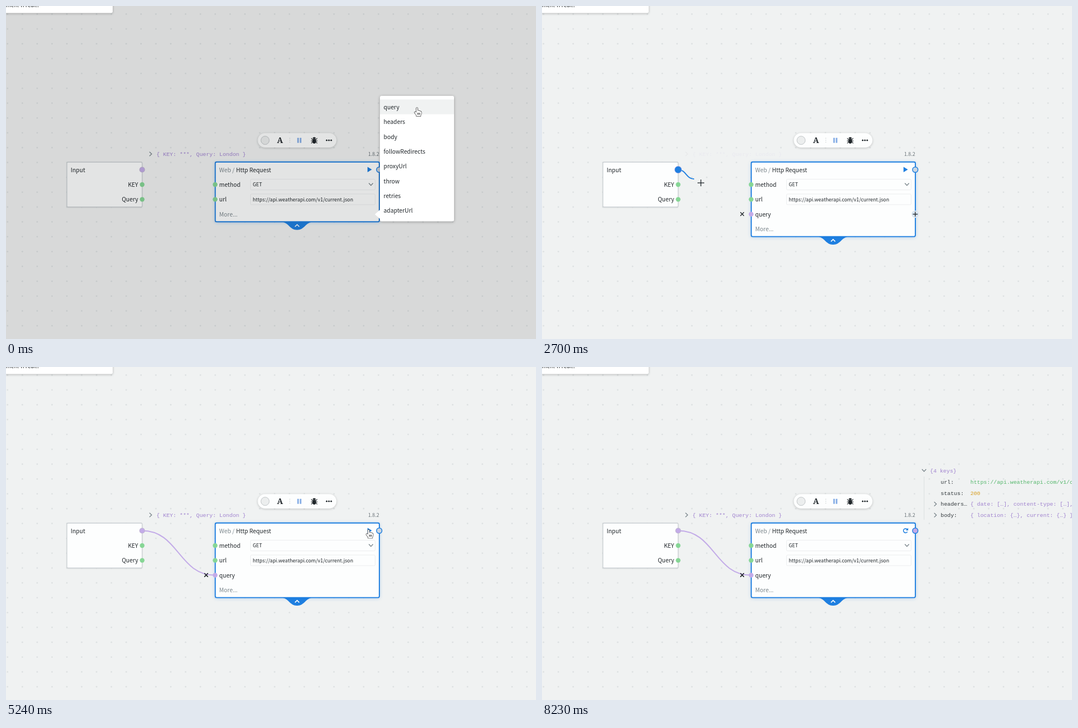
Animation of 944 by 593 pixels, one loop 8.38 s. Source, as an HTML page with a canvas:

```html
<!DOCTYPE html>
<html lang="en">
<head>
<meta charset="utf-8">
<title>Node editor</title>
<style>
html, body { margin: 0; width: 100%; height: 100%; overflow: hidden; background: #f0f2f2; }
canvas { display: block; width: 944px; height: 593px; }
</style>
</head>
<body>
<canvas id="stage"></canvas>
<script>
const W = 944, H = 593, LOOP = 8380, ROW = 26.43;
const canvas = document.getElementById('stage');
const ctx = canvas.getContext('2d');
const dpr = window.devicePixelRatio || 1;
canvas.width = W * dpr;
canvas.height = H * dpr;

const SANS = '"Noto Sans CJK JP", "Noto Sans CJK SC", "Noto Sans", sans-serif';
const MONO = '"Liberation Mono", "Courier New", monospace';
const BLUE = '#1f7fe0', PURPLE = '#c3abe8', GREEN = '#86d695', INK = '#20262a';
const GREY = '#7b868c', VIOLET = '#a083cf';
const rowY = i => 291.5 + i * ROW;

// Pointer waypoints: time, x, y
const PATH = [
  [0, 732, 181], [450, 731, 181], [900, 731, 181], [1050, 700, 196], [1200, 500, 296],
  [1350, 343, 353], [1500, 290, 366], [1800, 243, 318], [1950, 251, 307], [2100, 246, 299],
  [2250, 243, 292], [2550, 243, 292], [2700, 283, 315], [3000, 350, 366], [3150, 363, 379],
  [3600, 369, 374], [3750, 367, 372], [4050, 367, 372], [4200, 430, 358], [4350, 531, 332],
  [4500, 592, 312], [4800, 640, 294], [5240, 646, 289.5], [7040, 646, 289.5],
  [7180, 656, 300], [7330, 720, 365], [7630, 895, 530], [7780, 937, 572], [8080, 927, 591]
];

function pointer(t) {
  const i = PATH.findIndex(p => p[0] > t);
  if (i < 0) return PATH[PATH.length - 1].slice(1);
  const [t0, x0, y0] = PATH[i - 1], [t1, x1, y1] = PATH[i];
  const k = (t - t0) / (t1 - t0);
  return [x0 + (x1 - x0) * k, y0 + (y1 - y0) * k];
}

function tick(t) {
  const base = t < 5240 ? 0 : t < 7180 ? 5240 : 7180;
  return base + Math.floor((t - base) / 150) * 150;
}

function text(s, x, y, { size = 10.26, color = INK, font = SANS, align = 'left', weight = 400 } = {}) {
  ctx.font = `${weight} ${size}px ${font}`;
  ctx.textAlign = align;
  ctx.fillStyle = color;
  ctx.fillText(s, x, y);
}
const mono = (s, x, y, color = VIOLET) => text(s, x, y + 3, { size: 9.83, font: MONO, color });

function box(x, y, w, h, r, fill, stroke, lw = 1) {
  ctx.beginPath();
  ctx.roundRect(x, y, w, h, r);
  if (fill) { ctx.fillStyle = fill; ctx.fill(); }
  ctx.shadowColor = 'transparent';
  if (stroke) { ctx.strokeStyle = stroke; ctx.lineWidth = lw; ctx.stroke(); }
}

function shadow(color, blur, dy = 0) {
  ctx.shadowColor = color;
  ctx.shadowBlur = blur * dpr;
  ctx.shadowOffsetY = dy * dpr;
}

function dot(x, y, r, fill, stroke, lw = 1) {
  ctx.beginPath();
  ctx.arc(x, y, r, 0, 7);
  ctx.fillStyle = fill;
  ctx.fill();
  if (stroke) { ctx.strokeStyle = stroke; ctx.lineWidth = lw; ctx.stroke(); }
}

function line(color, lw, ...pts) {
  ctx.beginPath();
  pts.forEach(([x, y]) => ctx.lineTo(x, y));
  ctx.strokeStyle = color;
  ctx.lineWidth = lw;
  ctx.stroke();
}

const chevRight = (x, y) => line(GREY, 1.3, [x - 2, y - 3.7], [x + 2, y], [x - 2, y + 3.7]);
const chevDown = (x, y) => line(GREY, 1.3, [x - 3.7, y - 2], [x, y + 2], [x + 3.7, y - 2]);

function grid() {
  for (let x = 2.7; x < W; x += ROW)
    for (let y = 14.4; y < H; y += ROW) dot(x, y, 1.4, '#dde1e2');
}

function cable(x, y, color) {
  const x0 = 242.5, y0 = rowY(0), mx = (x0 + x) / 2;
  ctx.beginPath();
  ctx.moveTo(x0, y0);
  ctx.bezierCurveTo(mx, y0, mx, y, x, y);
  ctx.strokeStyle = color;
  ctx.lineWidth = 1.9;
  ctx.stroke();
}

function inputNode(label) {
  shadow('rgba(0,0,0,.1)', 3, 1);
  box(108.5, 278, 134, 80, 2, '#fdfefe', '#cbd0d3', 1.3);
  text('Input', 115.3, 295.5);
  text('KEY', 235.3, 322, { align: 'right' });
  text('Query', 235.3, 348.4, { align: 'right' });
  ctx.globalAlpha = label;
  chevRight(257.5, 263.5);
  mono('{ KEY: ***, Query: London }', 268, 264);
  ctx.globalAlpha = 1;
}

function toolbar() {
  shadow('rgba(0,0,0,.2)', 4, 1);
  box(448.5, 226.3, 140, 25.8, 12.9, '#fdfefe');
  dot(461.5, 239.2, 7.4, '#eceeee', '#c2c6c8', 1);
  text('A', 488, 244, { size: 14, weight: 700, align: 'center', font: '"Noto Serif", "Liberation Serif", serif' });
  [235.5, 239, 242.5].forEach(y => dot(505.5, y, .7, '#c3c8ca'));
  box(518.8, 234.8, 2.8, 9, .5, '#86aee6');
  box(523.3, 234.8, 2.8, 9, .5, '#86aee6');
  bug(549, 239.2);
  [-4, 0, 4].forEach(d => dot(575.2 + d, 239.2, 1.4, INK));
}

function bug(x, y) {
  [-1, 1].forEach(s => {
    line(INK, 1.1, [x, y - 1], [x + s * 4, y - 2], [x + s * 5.2, y - 4]);
    line(INK, 1.1, [x, y + 1], [x + s * 5.8, y + 1]);
    line(INK, 1.1, [x, y + 2], [x + s * 4, y + 3.4], [x + s * 5.2, y + 5.6]);
  });
  ctx.beginPath();
  ctx.ellipse(x, y + 1.5, 3.3, 4.4, 0, 0, 7);
  ctx.fillStyle = INK;
  ctx.fill();
  ctx.beginPath();
  ctx.arc(x, y - 3, 2.8, Math.PI, 0);
  ctx.fill();
}

function refresh(x, y) {
  ctx.beginPath();
  ctx.arc(x, y, 3.7, .5, 5.5);
  ctx.strokeStyle = BLUE;
  ctx.lineWidth = 1.5;
  ctx.stroke();
  ctx.beginPath();
  ctx.moveTo(x + 4.7, y - 5);
  ctx.lineTo(x + 4.7, y - .4);
  ctx.lineTo(x + .3, y - .4);
  ctx.fillStyle = BLUE;
  ctx.fill();
}

function play(x, y) {
  ctx.beginPath();
  ctx.moveTo(x - 3.6, y - 4.8);
  ctx.lineTo(x + 4.2, y);
  ctx.lineTo(x - 3.6, y + 4.8);
  ctx.closePath();
  ctx.fillStyle = BLUE;
  ctx.fill();
}

function requestNode(s) {
  const bottom = s.menu ? 384.2 : 410.6, tab = bottom + 1;
  ctx.beginPath();
  ctx.moveTo(490, tab - 1);
  ctx.bezierCurveTo(504, tab, 505, tab + 13.5, 518.5, tab + 13.5);
  ctx.bezierCurveTo(532, tab + 13.5, 533, tab, 547, tab - 1);
  ctx.fillStyle = BLUE;
  ctx.fill();
  shadow('rgba(31,127,224,.35)', 6, 1);
  box(372.7, 277.8, 292.3, bottom - 277.8, 2.5, '#fdfefe', BLUE, 1.9);
  line('#fff', 1.5, [514.7, tab + 7.8], [518.5, tab + 4], [522.3, tab + 7.8]);

  text('1.8.2', 664.6, 267, { size: 8.9, color: '#6d767b', align: 'right' });
  text('Web / ', 379.8, 295.5, { color: GREY });
  text('Http Request', 409.8, 295.5);
  s.ran ? refresh(647.5, 291.5) : play(647.5, 291.3);

  ['method', 'url'].forEach((name, i) => {
    const y = rowY(i + 1);
    text(name, 379.8, y + 4);
    box(435.5, y - 9.5, 222, 19, 2, null, '#eceeef');
    dot(372.5, y, 4.2, GREEN);
    dot(242.5, y, 4.2, GREEN);
  });
  text('GET', 439.5, rowY(1) + 3.4, { size: 8.85 });
  text('https://api.weatherapi.com/v1/current.json', 439.5, rowY(2) + 3.4, { size: 8.85 });
  chevDown(650, 317.5);

  if (!s.menu) {
    text('query', 379.8, rowY(3) + 4);
    line(INK, 1.3, [353.3, 367.3], [359.7, 373.7]);
    line(INK, 1.3, [359.7, 367.3], [353.3, 373.7]);
    if (!s.linked) {
      dot(664.8, 370.7, 6.5, '#d9e5f2');
      line(INK, 1.3, [660.5, 370.7], [669.1, 370.7]);
      line(INK, 1.3, [664.8, 366.4], [664.8, 375]);
    }
  }
  text('More...', 379.8, rowY(s.menu ? 3 : 4) + 4, { color: GREY });
  dot(664.8, 291.5, 4.8, s.result ? PURPLE : '#ccd7e2', BLUE, 1.5);
}

function sockets(s) {
  if (s.hover) dot(242.5, 291.5, 6.2, BLUE, 'rgba(195,171,232,.6)', .9);
  else dot(242.5, 291.5, 4.5, PURPLE, '#bcb0cf', 1.1);
  if (!s.menu) dot(372.5, rowY(3), 4.2, PURPLE);
}

function result(alpha) {
  ctx.globalAlpha = alpha;
  chevDown(680.5, 184);
  line('#dce0e1', 1, [680.5, 195], [680.5, 272]);
  mono('{4 keys}', 691, 184.5);
  mono('url:', 710, 204.8, '#343a3e');
  mono('https://api.weatherapi.com/v1/current.json', 763, 204.8, '#55b76c');
  mono('status:', 710, 224.5, '#343a3e');
  mono('200', 763, 224.5, '#d99f20');
  chevRight(700.5, 244);
  mono('headers…', 710, 244.3, '#343a3e');
  mono('{ date: […], content-type: […],', 763, 244.3);
  chevRight(700.5, 263.7);
  mono('body:', 710, 264, '#343a3e');
  mono('{ location: {…}, current: {…} }', 763, 264);
  ctx.globalAlpha = 1;
}

function cornerPanel() {
  shadow('rgba(0,0,0,.25)', 4, 1);
  box(-5, -20, 195, 32.5, 3, '#fff');
  text('men. n real..', -1, 1.5, { weight: 500, size: 10.4 });
}

function menu() {
  shadow('rgba(0,0,0,.3)', 5, 1);
  box(666, 160, 132, 223.5, 3, '#fff');
  ctx.beginPath();
  ctx.moveTo(666.5, 362.5);
  ctx.lineTo(657, 371);
  ctx.lineTo(666.5, 379.5);
  ctx.fillStyle = '#fff';
  ctx.fill();
  box(666, 166.5, 132, 26.2, 0, '#f0f2f2');
  ['query', 'headers', 'body', 'followRedirects', 'proxyUrl', 'throw', 'retries', 'adapterUrl']
    .forEach((name, i) => text(name, 672.6, 184 + i * 26.35));
}

function outlined(d, x, y, fill, stroke) {
  const p = new Path2D(d);
  ctx.save();
  ctx.translate(x, y);
  ctx.lineJoin = 'round';
  ctx.fillStyle = fill;
  ctx.strokeStyle = stroke;
  ctx.lineWidth = 1.1;
  ctx.stroke(p);
  ctx.fill(p);
  ctx.restore();
}

const CURSORS = {
  cross(x, y) {
    line(INK, 1.3, [x - 6, y], [x + 6, y]);
    line(INK, 1.3, [x, y - 6], [x, y + 6]);
  },
  arrow(x, y) {
    outlined('M0 0V12.2L2.9 9.5L4.9 14.2L6.9 13.3L4.9 8.8H8.8Z', x, y, '#000', '#fff');
  },
  hand(x, y) {
    outlined('M-1.3 8.6V1Q0 -1 1.3 1V5.4Q2.6 4.4 3.7 5.8Q5 5 6 6.5Q7.6 6.2 7.8 8V11Q7.5 12.6 6.6 13.4V15.3H-1V13.4Q-2.8 11.4 -4.6 8.8Q-4.6 7 -2.9 7.4Z',
      x, y, '#fff', '#000');
    [1.2, 3.1, 5].forEach(d => line('#000', .8, [x + d, y + 9.2], [x + d, y + 12.6]));
  }
};

function cursorKind(t) {
  if (t < 450 || (t >= 4800 && t < 7180)) return 'hand';
  return t >= 3750 && t < 4800 ? 'arrow' : 'cross';
}

function draw(time) {
  const t = tick(time);
  const s = {
    menu: t < 450,
    hover: t >= 2100 && t < 3750,
    drag: t >= 2700 && t < 3750,
    linked: t >= 3750,
    ran: t >= 5390,
    result: t >= 5690
  };
  const label = !s.drag ? (t === 3750 ? .5 : 1) : t === 2700 ? .07 : 0;

  ctx.setTransform(dpr, 0, 0, dpr, 0, 0);
  ctx.shadowColor = 'transparent';
  ctx.fillStyle = '#f0f2f2';
  ctx.fillRect(0, 0, W, H);
  grid();
  inputNode(label);
  toolbar();
  requestNode(s);
  if (s.linked) cable(372.5, rowY(3), PURPLE);
  if (s.drag) cable(...pointer(t - 45), BLUE);
  sockets(s);
  if (s.linked) {
    line(INK, 1.3, [353.3, 367.3], [359.7, 373.7]);
    line(INK, 1.3, [359.7, 367.3], [353.3, 373.7]);
  }
  if (s.result) result(t < 5840 ? .6 : 1);
  if (s.menu) {
    ctx.fillStyle = 'rgba(0,0,0,.1)';
    ctx.fillRect(0, 0, W, H);
  }
  cornerPanel();
  if (s.menu) menu();
  if (t < 8230) CURSORS[cursorKind(t)](...pointer(t));
}

function frame() {
  draw(performance.now() % LOOP);
  requestAnimationFrame(frame);
}
frame();
</script>
</body>
</html>
```
